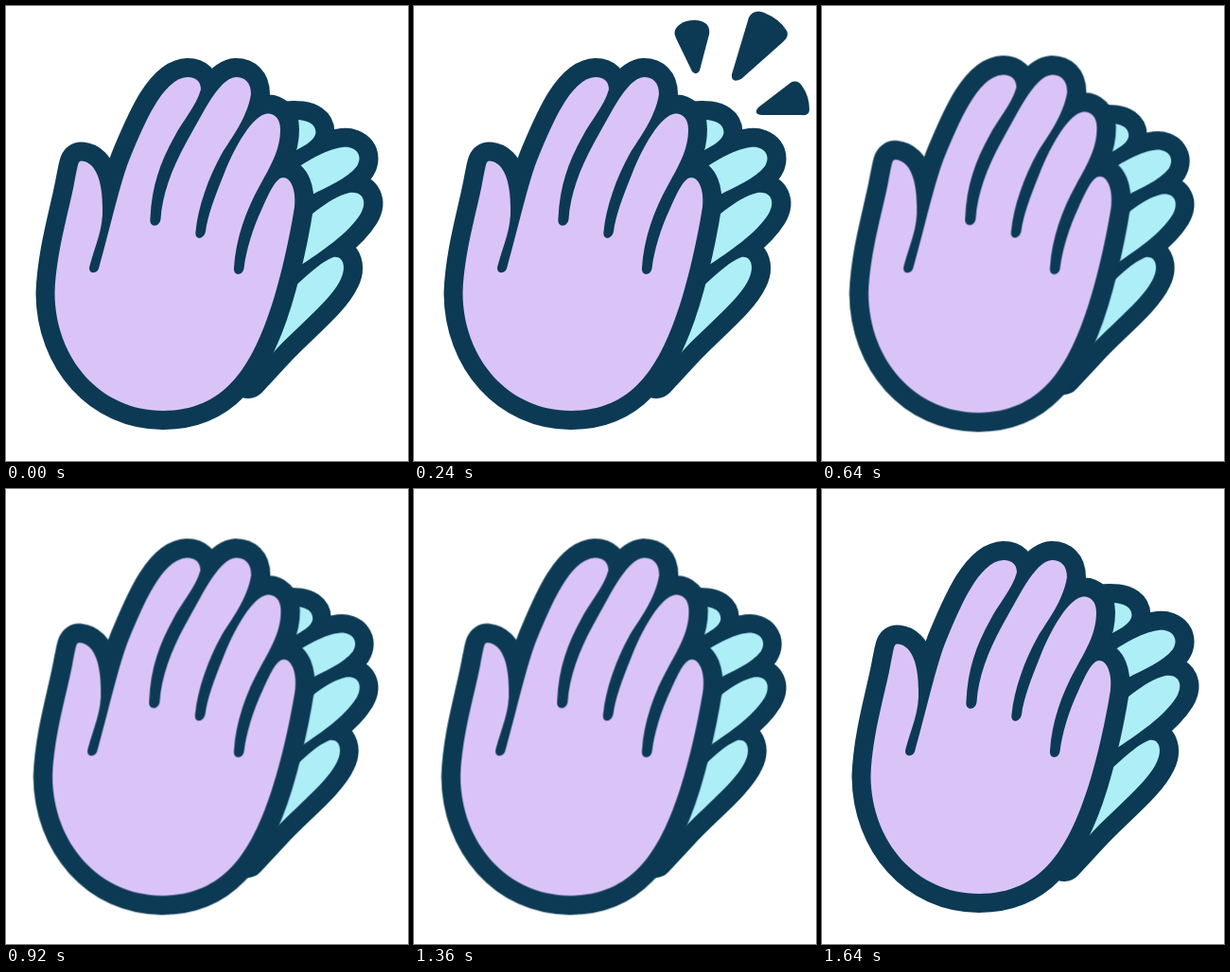
An HTML page without scripts that plays this animation: 425 px wide and 480 px high, repeating every 1760 ms.

```html
<!DOCTYPE html>
<html lang="en">
<head>
<meta charset="utf-8">
<title>Clapping hands</title>
<style>
  html, body { margin: 0; width: 100%; height: 100%; overflow: hidden; background: #fff; }
  svg { display: block; width: 425px; height: 480px; }

  .outline { fill: #0c3a54; stroke: #0c3a54; stroke-width: 40; stroke-linejoin: round; }
  .back { fill: #adeef7; }
  .front { fill: #dac4f7; stroke: #0c3a54; stroke-width: 40; stroke-linejoin: round; paint-order: stroke; }
  .sparks { fill: #0c3a54; visibility: hidden; }

  .front, .back-hand, .sparks { animation: 440ms step-end infinite; }
  .front { transform-origin: 245px 265px; animation-name: swing-front; }
  .back-hand { transform-origin: 199px 265px; animation-name: swing-back; }
  .sparks { animation-name: flash; }

  /* Eleven 40 ms ticks per clap: six of cosine swing, five at rest */
  @keyframes swing-front {
    0%, 54.53% { transform: scale(1); }
    9.08%, 45.44% { transform: scale(1.0125); }
    18.17%, 36.35% { transform: scale(1.0375); }
    27.26% { transform: scale(1.05); }
  }
  @keyframes swing-back {
    0%, 54.53% { transform: scale(1); }
    9.08%, 45.44% { transform: scale(.975); }
    18.17%, 36.35% { transform: scale(.925); }
    27.26% { transform: scale(.9); }
  }
  @keyframes flash {
    0%, 72.71% { visibility: hidden; }
    54.53% { visibility: visible; }
  }
</style>
</head>
<body>
<svg viewBox="0 0 425 480">
  <defs>
    <g id="fingers">
      <path d="M285 122C300 119 327 117 327.5 133C327 143 312 149 300 156L270 150Z"/>
      <path d="M290 183C312 167 337 151 356 149C370 147.5 378 158 371 169C360 183 340 190 322 200L285 219Z"/>
      <path d="M290 245C318 226 340 202 363 197C378 195 382 207 375 219C362 240 335 258 308 276L270 290Z"/>
      <path d="M280 317C312 292 328 272 346 265C357 263 360 276 354 288C344 310 310 336 284 364L256 394Z"/>
    </g>
  </defs>

  <g class="back-hand">
    <use href="#fingers" class="outline"/>
    <use href="#fingers" class="back"/>
  </g>

  <path class="front" d="M80 163.5C76 163 76 168 73 182C68 212 53 258 51.5 303
    C52 372 100 427 166 427C232 427 257 378 273 338C287 303 299 250 305 212
    C307 194 301 181 293 181C285 181 278 198 271 213C261 234 254 257 251.5 277
    C250 285 240 285 241 276C243 245 254 215 268 190C282 165 290 150 290 130
    C290 118 283 113 276 113.5C261 115 242 148 230.5 177C220 203 213 222 211 238
    C209 247 199 247 200.5 238C203 212 214 181 228 156C239 138 255 118 259 93
    C259 80 252 75 243 75C224 76 205 120 190 145C175 172 165 200 163.5 225
    C162 234 151 234 152.5 224C154 190 163 165 178 138C186 122 201 106 206 88
    C206 80 201 75 192 75C165 76 145 128 132 158C121 184 110 235 98 277
    C95 284 86 282 88.5 274C95 250 103 235 102 212C102 190 97 165 80 163.5Z"/>

  <g class="sparks">
    <path d="M276 31C273 22 285 14 298 15C311 16 313 23 312 30L302 68Q299 74 294 69L277 34Z"/>
    <path d="M354 12Q359 3 370 7Q387 14 394 26Q397 32 390 38L346 77Q335 82 336 72Z"/>
    <path d="M364 107L398 81Q405 77 410 84Q418 95 418 109Q418 116 410 115L368 115Q358 114 364 107Z"/>
  </g>
</svg>
</body>
</html>
```
